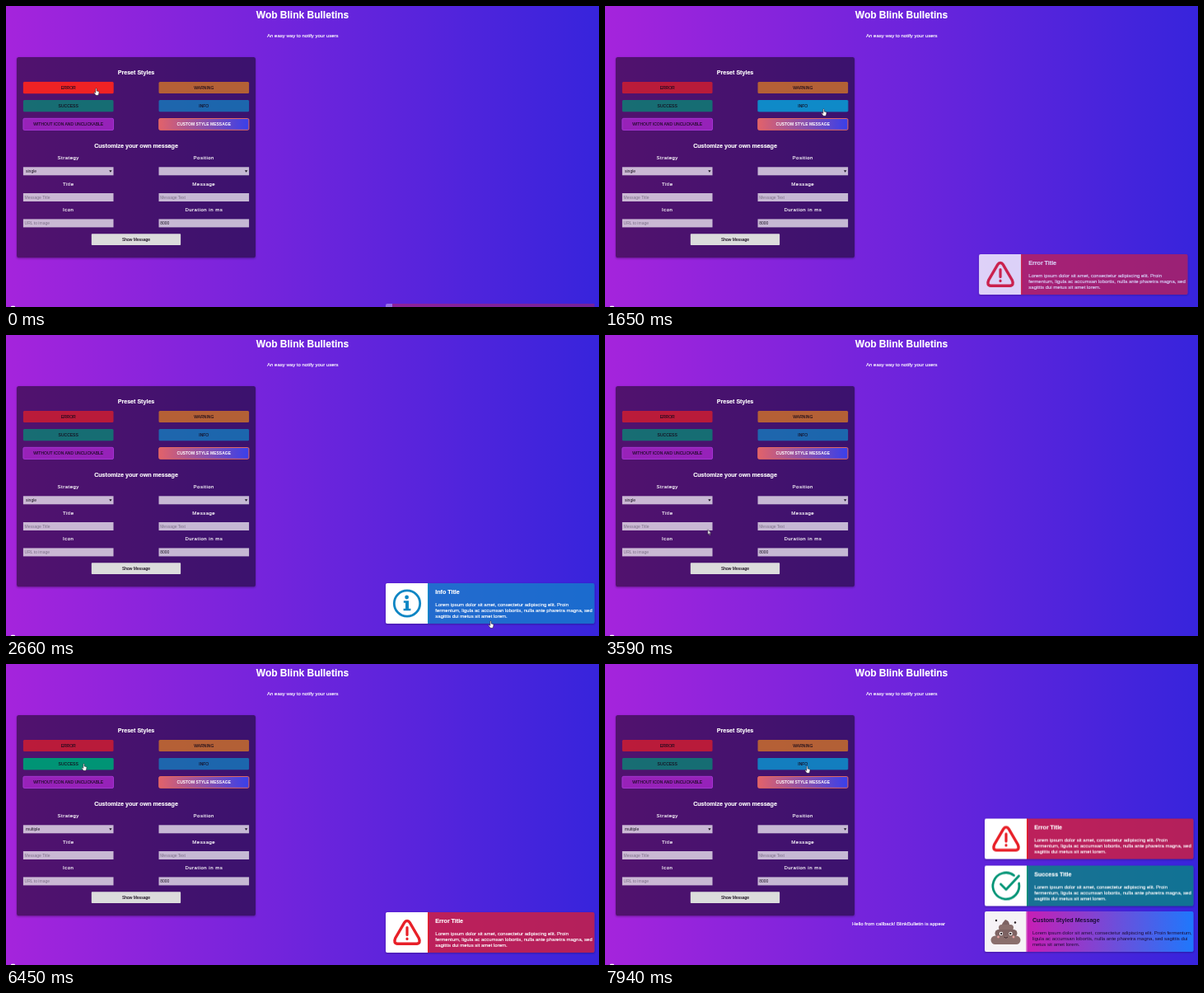
An HTML page that plays this animation: 720 by 365 pixels, repeating every 8 s.

```html
<!DOCTYPE html>
<html lang="en">
<head>
<meta charset="utf-8">
<title>Notifications demo</title>
<style>
html, body { margin: 0; width: 100%; height: 100%; overflow: hidden; background: #6a24da; }
svg { display: block; width: 720px; height: 365px; font-family: "Liberation Sans", Arial, sans-serif; }
.mid { text-anchor: middle; }
.white { fill: #fff; stroke: #fff; stroke-width: .15; }
.h { font-weight: bold; font-size: 7.1px; }
.s6 { font-size: 6px; }
.lab { font-size: 6px; letter-spacing: .5px; text-anchor: middle; }
.btn { font-size: 5px; text-anchor: middle; fill: #160a1c; stroke: #160a1c; stroke-width: .1; }
.in { font-size: 5px; fill: #1c1424; }
.ph { font-size: 5px; fill: #7d7189; }
.field { fill: #fff; fill-opacity: .7; }
.dim { fill-opacity: .7; }
.shadow { filter: url(#outer); }

.error { fill: #f02224; animation: hovError 8s linear infinite; }
.success { fill: #009475; animation: hovSuccess 8s linear infinite; }
.info { fill: #0f8ac8; animation: hovInfo 8s linear infinite; }
@keyframes hovError {
  0%, 8.2% { opacity: 1 } 11.2%, 68.2% { opacity: 0 }
  70.7%, 77.8% { opacity: 1 } 80.2%, 100% { opacity: 0 }
}
@keyframes hovSuccess {
  0%, 78.3% { opacity: 0 } 80.3%, 86.2% { opacity: 1 } 88.8%, 100% { opacity: 0 }
}
@keyframes hovInfo {
  0%, 13% { opacity: 0 } 15.2%, 27.5% { opacity: 1 }
  30%, 97% { opacity: 0 } 100% { opacity: .9 }
}

/* toasts: back easing for the pose, linear for the fade */
.toast { animation-duration: 8s, 8s; animation-iteration-count: infinite;
  animation-timing-function: cubic-bezier(.68, -.55, .265, 1.55), linear; }
.e1 { animation-name: e1, e1Fade; }
.in1 { animation-name: i1, i1Fade; }
.e2 { animation-name: e2, e2Fade; }
.ok { animation-name: ok, okFade; }
.cu { animation-name: cu, cuFade; }
@keyframes e1 {
  0% { transform: translate(0, 60px); animation-timing-function: cubic-bezier(.35, .6, .4, 1.4) }
  4.8%, 19.1% { transform: translate(0, 0) }
  26.6%, 100% { transform: translate(75px, 0) }
}
@keyframes e1Fade {
  0%, .87% { opacity: 0 } .88% { opacity: .55 } 4.5%, 19.1% { opacity: 1 } 26.6%, 100% { opacity: 0 }
}
@keyframes i1 {
  0%, 19.1% { transform: translate(0, 75px) }
  26.6%, 36.8% { transform: translate(0, 0) }
  44.2%, 100% { transform: translate(75px, 0) }
}
@keyframes i1Fade {
  0%, 19.1% { opacity: 0 } 26.6%, 36.8% { opacity: 1 } 44.2%, 100% { opacity: 0 }
}
@keyframes e2 {
  0%, 68.75% { transform: translate(0, 75px) }
  76.25%, 81.25% { transform: translate(0, 0) }
  88.75%, 92% { transform: translate(0, -57px) }
  99.2%, 100% { transform: translate(0, -113.5px) }
}
@keyframes e2Fade { 0%, 68.75% { opacity: 0 } 76.25%, 100% { opacity: 1 } }
@keyframes ok {
  0%, 81.25% { transform: translate(0, 75px) }
  88.75%, 92% { transform: translate(0, 0) }
  99.2%, 100% { transform: translate(0, -56.5px) }
}
@keyframes okFade { 0%, 81.25% { opacity: 0 } 88.75%, 100% { opacity: 1 } }
@keyframes cu { 0%, 92% { transform: translate(0, 75px) } 99.2%, 100% { transform: translate(0, -1px) } }
@keyframes cuFade { 0%, 92% { opacity: 0 } 99.2%, 100% { opacity: 1 } }

.step { animation: 8s step-end infinite; }
.first { animation-name: first; }
.single { animation-name: single; }
.multi { animation-name: multi; }
.ring { animation-name: ring; }
.hello { animation-name: hello; }
.hand { animation-name: hand; }
.arrow { animation-name: arrow; }
@keyframes first { 0% { opacity: 1 } .88%, 100% { opacity: 0 } }
@keyframes single { 0% { opacity: 1 } 64.1%, 100% { opacity: 0 } }
@keyframes multi { 0% { opacity: 0 } 64.1%, 100% { opacity: 1 } }
@keyframes ring { 0% { opacity: 0 } 50.5% { opacity: 1 } 68.75%, 100% { opacity: 0 } }
@keyframes hello { 0% { opacity: 0 } 94.2%, 100% { opacity: 1 } }
@keyframes hand {
  0% { opacity: 1 } 8.5% { opacity: 0 } 13% { opacity: 1 } 27.9% { opacity: 0 } 31% { opacity: 1 }
  38.5% { opacity: 0 } 68.2% { opacity: 1 } 86.8% { opacity: 0 } 88.4%, 100% { opacity: 1 }
}
@keyframes arrow {
  0% { opacity: 0 } 8.5% { opacity: 1 } 13% { opacity: 0 } 27.9% { opacity: 1 } 31% { opacity: 0 }
  38.5% { opacity: 1 } 68.2% { opacity: 0 } 86.8% { opacity: 1 } 88.4%, 100% { opacity: 0 }
}
.cursor { animation: cursor 8s linear infinite; fill: #fff; stroke: #1b1320; stroke-width: .5; }
@keyframes cursor {
  0%, 7.5% { transform: translate(110px, 104px) }
  14.6%, 27% { transform: translate(266px, 129px) }
  28.25% { transform: translate(316px, 150px) }
  29.5% { transform: translate(451px, 217px) }
  31.5%, 37.9% { transform: translate(589px, 351px) }
  42% { transform: translate(313px, 298px) }
  44.5% { transform: translate(134px, 245px) }
  47.5%, 55% { transform: translate(78px, 203px) }
  57.2%, 60.5% { transform: translate(68px, 220px) }
  62%, 65.8% { transform: translate(68px, 217.5px) }
  68.5%, 76.5% { transform: translate(85px, 101px) }
  79.5%, 85.6% { transform: translate(95px, 125px) }
  87% { transform: translate(164px, 143px) }
  88% { transform: translate(195px, 155px) }
  88.8%, 91.2% { transform: translate(245px, 152px) }
  91.3% { transform: translate(245px, 149.5px) }
  92.2%, 96% { transform: translate(245px, 152px) }
  98%, 100% { transform: translate(246px, 128px) }
}
</style>
</head>
<body>
<svg viewBox="0 0 720 365">
  <defs>
    <!-- shadow outside the shape only, so translucent fills stay clean -->
    <filter id="outer" x="-5%" y="-20%" width="110%" height="140%" color-interpolation-filters="sRGB">
      <feComponentTransfer in="SourceAlpha" result="solid"><feFuncA type="linear" slope="3"/></feComponentTransfer>
      <feOffset dy=".8"/>
      <feGaussianBlur stdDeviation="1.3"/>
      <feComponentTransfer><feFuncA type="linear" slope=".3"/></feComponentTransfer>
      <feComposite operator="out" in2="solid" result="halo"/>
      <feMerge><feMergeNode in="halo"/><feMergeNode in="SourceGraphic"/></feMerge>
    </filter>
    <linearGradient id="bg"><stop stop-color="#a524dc"/><stop offset="1" stop-color="#3724dc"/></linearGradient>
    <linearGradient id="fancy"><stop stop-color="#e2626a"/><stop offset="1" stop-color="#393fea"/></linearGradient>
    <linearGradient id="glow"><stop stop-color="#c81eb4"/><stop offset="1" stop-color="#1e78fc"/></linearGradient>
    <rect id="b" width="109.6" height="14.2" rx="1.5"/>
    <rect id="f" class="field" width="109.6" height="10"/>
    <path id="tri" d="M487 311.5Q489 311.5 490.3 313.7L501.3 332.5Q504 338.8 498.5 339.3H475.5Q470 338.8 472.7 332.5L483.7 313.7Q485 311.5 487 311.5Z"/>
    <g id="lorem" class="s6">
      <text x="521.3" y="328.7">Lorem ipsum dolor sit amet, consectetur adipiscing elit. Proin</text>
      <text x="521.3" y="335.6">fermentum, ligula ac accumsan lobortis, nulla ante pharetra magna, sed</text>
      <text x="521.3" y="342.5">sagittis dui metus sit amet lorem.</text>
    </g>
    <path id="card" d="M512 301H712.5Q714.5 301 714.5 303V348Q714.5 350 712.5 350H512Z"/>
    <path id="pad" d="M512.5 301H463Q461 301 461 303V348Q461 350 463 350H512.5Z"/>

    <g id="err" class="shadow">
      <use href="#card" fill="#e82024" class="dim"/><use href="#pad" fill="#fff"/>
      <rect x="512" y="301" width="1.5" height="49" fill="#e82028"/>
      <use href="#tri" fill="none" stroke="#e82028" stroke-width="3.4"/>
      <path d="M487 319.5V328.5M487 333.2V333.4" stroke="#e82028" stroke-width="3.2" stroke-linecap="round"/>
      <g class="white"><text class="h" x="521.3" y="314.3">Error Title</text><use href="#lorem"/></g>
    </g>
    <g id="inf" class="shadow">
      <use href="#card" fill="#0f8ac8" class="dim"/><use href="#pad" fill="#fff"/>
      <rect x="512" y="301" width="1.5" height="49" fill="#0f8ac8"/>
      <circle cx="487" cy="325.5" r="15.7" fill="none" stroke="#0f86c4" stroke-width="2.8"/>
      <circle cx="486.6" cy="318" r="2.4" fill="#0f86c4"/>
      <path d="M482.8 322.3H489V331.8H491.4V334.3H482.6V331.8H485V324.8H482.8Z" fill="#0f86c4"/>
      <g class="white"><text class="h" x="521.3" y="314.3">Info Title</text><use href="#lorem"/></g>
    </g>
    <g id="suc" class="shadow">
      <use href="#card" fill="#009475" class="dim"/><use href="#pad" fill="#fff"/>
      <rect x="512" y="301" width="1.5" height="49" fill="#009475"/>
      <g fill="none" stroke="#009475" stroke-width="2.8" stroke-linecap="round" stroke-linejoin="round">
        <path d="M496.5 312.8A16 16 0 1 0 502.6 322.5"/>
        <path d="M480.5 323.5L487 330 502.5 313.5"/>
      </g>
      <g class="white"><text class="h" x="521.3" y="314.3">Success Title</text><use href="#lorem"/></g>
    </g>
    <g id="cus" class="shadow">
      <use href="#card" fill="url(#glow)"/><use href="#pad" fill="#f6f2f6"/>
      <rect x="511.5" y="301" width="1" height="49" fill="#c81eb4"/>
      <g fill="#7d6262">
        <path d="M486 311Q491.5 312 491 319H481Q482 315 486 311Z"/>
        <rect x="478" y="317" width="18" height="7.5" rx="3.7" fill="#8a6e6c"/>
        <rect x="473.5" y="323" width="27" height="9" rx="4.5"/>
        <rect x="468.5" y="330.5" width="36" height="10.5" rx="5.2" fill="#8a6e6c"/>
      </g>
      <g fill="#fff"><circle cx="481" cy="328" r="2.2"/><circle cx="492.5" cy="328" r="2.2"/></g>
      <g fill="#2a1c22"><circle cx="481.2" cy="328" r="1.2"/><circle cx="492.3" cy="328" r="1.2"/>
        <circle cx="475" cy="312" r="1.2"/><circle cx="498" cy="314.5" r="1.2"/></g>
      <path d="M484.5 332Q487 334.5 489 332" fill="none" stroke="#2a1c22" stroke-width=".8"/>
      <g fill="#e6a0a0"><circle cx="477.5" cy="332" r="1.4"/><circle cx="496" cy="332" r="1.4"/></g>
      <g fill="#1d0d38">
        <text class="h" x="519" y="314.3">Custom Styled Message</text>
        <g class="s6">
          <text x="519" y="328.7">Lorem ipsum dolor sit amet, consectetur adipiscing elit. Proin fermentum,</text>
          <text x="519" y="335.6">ligula ac accumsan lobortis, nulla ante pharetra magna, sed sagittis dui</text>
          <text x="519" y="342.5">metus sit amet lorem.</text>
        </g>
      </g>
    </g>
  </defs>

  <rect width="720" height="365" fill="url(#bg)"/>
  <rect x="6" y="363.8" width="5" height="4" rx="1" fill="#fff"/>
  <text class="mid white" x="360" y="15.2" font-size="12" font-weight="bold">Wob Blink Bulletins</text>
  <text class="mid white s6" x="360.3" y="37.7">An easy way to notify your users</text>

  <rect class="shadow" x="13" y="62" width="290" height="243.3" rx="2.5" fill="#000" fill-opacity=".5"/>
  <text class="mid white h" x="158" y="82.8">Preset Styles</text>
  <g class="dim">
    <use href="#b" x="20.9" y="91.9" fill="#e82024"/>
    <use href="#b" x="185.5" y="91.9" fill="#e6821e"/>
    <use href="#b" x="20.9" y="114" fill="#009475"/>
    <use href="#b" x="185.5" y="114" fill="#0f8ac8"/>
    <use href="#b" x="20.9" y="136.3" fill="#b72ad9" stroke="#b03ae0" stroke-width=".8"/>
  </g>
  <use href="#b" class="error" x="20.9" y="91.9"/>
  <use href="#b" class="success" x="20.9" y="114"/>
  <use href="#b" class="info" x="185.5" y="114"/>
  <rect x="185.7" y="136.5" width="109.2" height="13.8" rx="1.5" fill="url(#fancy)" stroke="#f0705f" stroke-width=".9"/>
  <g class="btn">
    <text x="75.7" y="100.8">ERROR</text>
    <text x="240.3" y="100.8">WARNING</text>
    <text x="75.7" y="122.9">SUCCESS</text>
    <text x="240.3" y="122.9">INFO</text>
    <text x="75.7" y="145.1">WITHOUT ICON AND UNCLICKABLE</text>
    <text x="240.3" y="145.1" fill="#fff" stroke="none" font-weight="bold">CUSTOM STYLE MESSAGE</text>
  </g>

  <text class="mid white h" x="158" y="172">Customize your own message</text>
  <g class="lab white">
    <text x="75.7" y="186">Strategy</text><text x="240.3" y="186">Position</text>
    <text x="75.7" y="217.9">Title</text><text x="240.3" y="217.9">Message</text>
    <text x="75.7" y="249.4">Icon</text><text x="240.3" y="249.4">Duration in ms</text>
  </g>
  <use href="#f" x="20.9" y="195.3"/><use href="#f" x="185.5" y="195.3"/>
  <use href="#f" x="20.9" y="227"/><use href="#f" x="185.5" y="227"/>
  <use href="#f" x="20.9" y="258.4"/><use href="#f" x="185.5" y="258.4"/>
  <rect class="step ring" x="20.8" y="195" width="109.8" height="10.6" rx=".8" fill="none" stroke="#7fa4ff" stroke-width="1"/>
  <path d="M125.2 199.3H128.6L126.9 201.7ZM289.9 199.3H293.3L291.6 201.7Z" fill="#1c1424"/>
  <text class="in step single" x="24" y="202">single</text>
  <text class="in step multi" x="24" y="202">multiple</text>
  <text class="ph" x="22.6" y="233.8">Message Title</text>
  <text class="ph" x="187.2" y="233.8">Message Text</text>
  <text class="ph" x="22.6" y="265.3">URL to image</text>
  <text class="in" x="187.2" y="265.3">8000</text>
  <rect x="103.8" y="276.3" width="108.3" height="13.7" rx=".8" fill="#dcdcdc"/>
  <text class="btn" x="158" y="285">Show Message</text>

  <text class="white s6 step hello" x="300" y="316.6">Hello from callback! BlinkBulletin is appear</text>

  <g class="step first">
    <rect x="469" y="361" width="245.5" height="6" fill="#e82024" opacity=".35"/>
    <path d="M469 361H463Q461 361 461 363V367H469Z" fill="#fff" opacity=".35"/>
  </g>
  <use href="#err" class="toast e1"/>
  <use href="#inf" class="toast in1"/>
  <use href="#err" class="toast e2"/>
  <use href="#suc" class="toast ok"/>
  <use href="#cus" class="toast cu"/>

  <g class="cursor">
    <path class="step hand" d="M-1.2-3.8Q-.5-4.6 .1-3.8V-1L2.1-.6Q3.1-.3 3 .6L2.6 3 1.9 4.3H-1L-3.2 1Q-3 .1-2.2 .6L-1.2 1.4Z"/>
    <path class="step arrow" d="M-2-3.6V2.3L-.7 1.1 .2 3.3 1.2 2.9 .3 .8H2.2Z"/>
  </g>
</svg>
</body>
</html>
```
